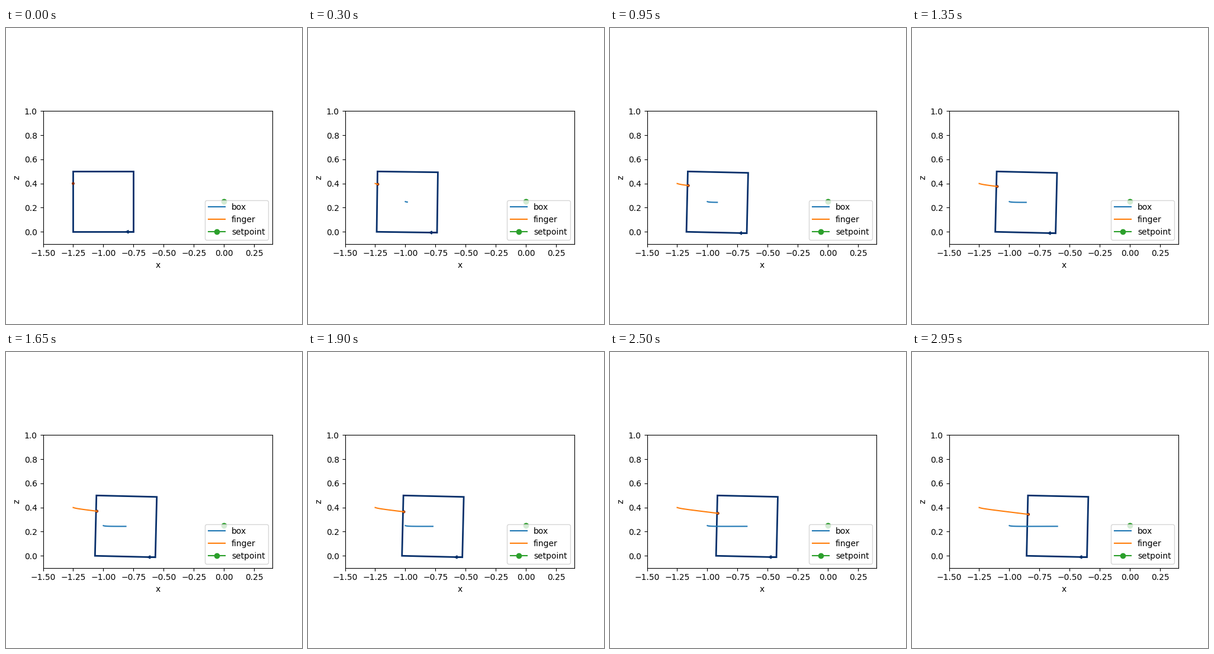
Animation of 500x500 px, one loop 3000 ms. Source, as a matplotlib script:

```python
import numpy as np
import matplotlib.pyplot as plt
from matplotlib.animation import FuncAnimation
from matplotlib.patches import Circle, Polygon

FRAMES, INTERVAL = 60, 50
SIDE = 0.5
DARK_BLUE, DARK_ORANGE = "#08306b", "#7f2704"

# Motion over the whole push: slide of the pivot corner, tilt, contact point
k = np.arange(FRAMES)
knots = [0, 11, 19, 27, 38, 50, 59]
slide_px = [0, 6.5, 15.6, 27.2, 45.2, 65.7, 80.1]
slide = np.polyval(np.polyfit(knots, slide_px, 4), k) / 203.95
slide -= slide[0]
tilt = 0.027 * (1 - np.exp(-k / 8)) - 0.00008 * k

pivot_x = -1.25 + slide
box_x = pivot_x + SIDE / 2 * (np.cos(tilt) + np.sin(tilt))
box_z = SIDE / 2 * (np.cos(tilt) - np.sin(tilt))
finger_x = pivot_x + 0.68 * tilt
finger_z = 0.4 - 0.126 * (finger_x + 1.25) - 0.235 * tilt


def place(points, i):
    """Map box-frame points (pivot corner at the origin) to the world."""
    c, s = np.cos(tilt[i]), np.sin(tilt[i])
    return np.array(points) @ np.array([[c, -s], [s, c]]) + [pivot_x[i], 0]


SQUARE = [(0, 0), (SIDE, 0), (SIDE, SIDE), (0, SIDE)]


def arrow_shape(length=0.065, head=0.0225, half_head=0.0125, half_shaft=0.003):
    tip, neck = SIDE - length, SIDE - length + head
    return [(tip, 0), (neck, half_head), (neck, half_shaft), (SIDE, half_shaft),
            (SIDE, -half_shaft), (neck, -half_shaft), (neck, -half_head)]


ARROW = arrow_shape()

fig, ax = plt.subplots(figsize=(5, 5), dpi=100)
ax.set_aspect("equal")
ax.set_xlim(-1.5, 0.4)
ax.set_ylim(-0.1, 1.0)
ax.set_xlabel("x")
ax.set_ylabel("z")

box = ax.add_patch(Polygon(SQUARE, fill=False, ec=DARK_BLUE, lw=2))
arrow = ax.add_patch(Polygon(ARROW, fc=DARK_BLUE, ec=DARK_BLUE, lw=1))
finger = ax.add_patch(Circle((-1.25, 0.4), 0.005, fc=DARK_ORANGE,
                             ec=DARK_ORANGE, lw=2))
box_trace, = ax.plot([], [], color="C0", label="box")
finger_trace, = ax.plot([], [], color="C1", label="finger")
ax.plot([0], [0.25], color="C2", marker="o", label="setpoint")
ax.legend(loc="lower right")


def update(i):
    box.set_xy(place(SQUARE, i))
    arrow.set_xy(place(ARROW, i))
    finger.center = finger_x[i], finger_z[i]
    box_trace.set_data(box_x[:i + 1], box_z[:i + 1])
    finger_trace.set_data(finger_x[:i + 1], finger_z[:i + 1])
    return box, arrow, finger, box_trace, finger_trace


anim = FuncAnimation(fig, update, frames=FRAMES, interval=INTERVAL,
                     repeat=True, repeat_delay=0)
plt.show()
```
